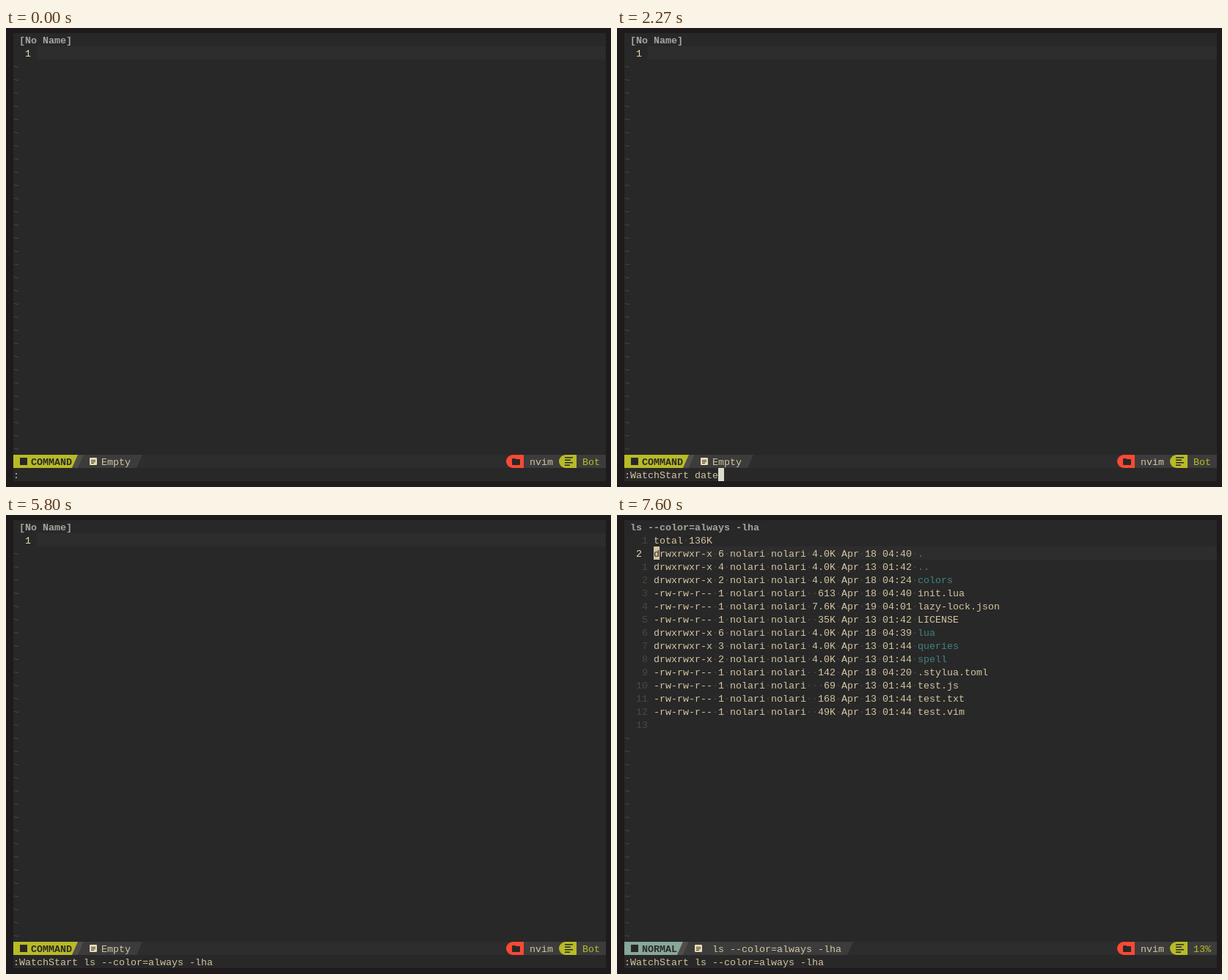
An HTML page with a canvas that plays this animation: 825x627 px, repeating every 8000 ms.

```html
<!DOCTYPE html>
<html>
<head>
<meta charset="utf-8">
<style>
html, body { margin: 0; width: 100%; height: 100%; overflow: hidden; background: #1f1a1b; }
canvas { display: block; }
</style>
</head>
<body>
<canvas id="stage" width="825" height="627"></canvas>
<script>
const ctx = document.getElementById('stage').getContext('2d');
const LOOP = 8000, COL = 8, ROW = 18, LEFT = 10, TOP = 7;
const BG = '#282828', LINE = '#2d2d2d', PANEL = '#3c3c3c', GAP = '#504c4a', FG = '#d5c4a1', BRIGHT = '#ebdbb2',
  DIM = '#4b4744', TEAL = '#458080', PINK = '#c08288', LIME = '#b8bb26', RED = '#fb4934', SAGE = '#88a898',
  BLOCK = '#dcdcd0';
const LS = 'ls --color=always -lha', USER = 'nolari';
const COMMANDS = ['WLR', 'WhichKey', 'WatchFile', 'WatchStop', 'WatchStart'];

const dir = (links, size, date, name) => entry('drwxrwxr-x', links, size, date, name, TEAL);
const file = (size, date, name) => entry('-rw-rw-r--', 1, size, date, name, FG);
function entry(mode, links, size, date, name, color) {
  return { info: `${mode} ${links} ${USER} ${USER} ${size.padStart(4)} Apr ${date} `, name, color };
}
const LISTING = [
  { info: 'total 136K', name: '' },
  dir(6, '4.0K', '18 04:40', '.'),
  dir(4, '4.0K', '13 01:42', '..'),
  dir(2, '4.0K', '18 04:24', 'colors'),
  file('613', '18 04:40', 'init.lua'),
  file('7.6K', '19 04:01', 'lazy-lock.json'),
  file('35K', '13 01:42', 'LICENSE'),
  dir(6, '4.0K', '18 04:39', 'lua'),
  dir(3, '4.0K', '13 01:44', 'queries'),
  dir(2, '4.0K', '13 01:44', 'spell'),
  file('142', '18 04:20', '.stylua.toml'),
  file('69', '13 01:44', 'test.js'),
  file('168', '13 01:44', 'test.txt'),
  file('49K', '13 01:44', 'test.vim'),
  { info: '', name: '' }
];

// Each step overrides the state from its time onward.
const STEPS = [
  [0, { cmd: ':', cursor: false, popup: 0, line: 0, block: BLOCK }],
  [200, { cursor: true }],
  [730, { cmd: ':W', popup: 5, match: 1 }],
  [1200, { cmd: ':Wa' }],
  [1270, { popup: 3, match: 2 }],
  [1670, { cursor: false }],
  [2200, { cmd: ':WatchStart date', cursor: true }],
  [2270, { popup: 0 }],
  [2800, { cmd: ':WatchStart ' + LS }],
  [3270, { cursor: false }],
  [3800, { cursor: true }],
  [4270, { cursor: false }],
  [4730, { cursor: true }],
  [5270, { cursor: false }],
  [5330, { cmd: `:WatchStart ${LS} `, cursor: true }],
  [5800, { cursor: false }],
  [6330, { cursor: true }],
  [6470, { cmd: ':WatchStart ' + LS, block: FG }],
  [6800, { line: 1 }],
  [7270, { cursor: false }],
  [7600, { line: 2, cursor: true }]
];

const px = col => LEFT + col * COL;
const py = row => TOP + row * ROW;

function rect(x, y, w, h, color) {
  ctx.fillStyle = color;
  ctx.fillRect(x, y, w, h);
}

function text(col, row, str, color, bold) {
  ctx.font = `${bold ? 'bold ' : ''}13.333px "Liberation Mono", monospace`;
  ctx.fillStyle = color;
  ctx.fillText(str, px(col), py(row) + 14);
}

function rounded(x, y, w, h, radii, color) {
  ctx.fillStyle = color;
  ctx.beginPath();
  ctx.roundRect(x, y, w, h, radii);
  ctx.fill();
}

// Status segment with slanted right edge, and left edge unless it is flush.
function segment(from, to, color, flush) {
  const y = py(32);
  ctx.fillStyle = color;
  ctx.beginPath();
  ctx.moveTo(px(from), y);
  ctx.lineTo(px(to), y);
  ctx.lineTo(px(to - 1), y + ROW);
  ctx.lineTo(px(flush ? from : from - 1), y + ROW);
  ctx.fill();
}

function statusBar(line) {
  const y = py(32);
  const mode = line ? 'NORMAL' : 'COMMAND';
  const edge = line ? 10 : 11;
  const iconX = px(edge + 2);
  rect(LEFT, y, 808, ROW, LINE);
  segment(edge + 1, line ? 39 : 22, PANEL);
  segment(edge, edge + 1, GAP);
  segment(0, edge, line ? SAGE : LIME, true);
  rect(19, y + 4, 10, 10, BG);
  text(3, 32, mode, BG, true);
  rounded(iconX, y + 4, 10, 10, 1, BRIGHT);
  [[3, 6], [5, 6], [7, 4]].forEach(([dy, w]) => rect(iconX + 2, y + 4 + dy, w, 1, PANEL));
  text(15, 32, line ? LS : 'Empty', FG);

  rect(706, y, 112, ROW, PANEL);
  rounded(682, y, 24, ROW, [9, 0, 0, 9], RED);
  rounded(690, y + 5, 5, 4, 1, BG);
  rounded(690, y + 6, 11, 8, 1, BG);
  text(88, 32, 'nvim', FG);
  rounded(754, y, 24, ROW, [9, 0, 0, 9], LIME);
  [11, 8, 11, 7].forEach((w, i) => rect(762, y + 3 + i * 3.5, w, 1.5, BG));
  text(97, 32, ['Bot', 'Top', '13%'][line], LIME);
}

function popup(count, match) {
  const top = 31 - count;
  rect(LEFT, py(top), 27 * COL, (count + 2) * ROW, BG);
  ctx.strokeStyle = '#5d5650';
  ctx.lineWidth = 1;
  ctx.beginPath();
  ctx.roundRect(13.5, py(top) + 8.5, 208, (count + 1) * ROW, 4);
  ctx.stroke();
  COMMANDS.slice(-count).forEach((name, i) => {
    const row = top + 1 + i;
    text(2, row, name.slice(0, match), TEAL, true);
    text(2 + match, row, name.slice(match), FG);
    text(14, row, 'α', PINK, true);
    text(17, row, 'Variable', PINK);
  });
}

function listing(current) {
  rect(px(5), py(current), 818 - px(5), ROW, LINE);
  LISTING.forEach(({ info, name, color }, i) => {
    const row = i + 1;
    if (row === current) text(2, row, String(row), BRIGHT);
    else text(2, row, String(Math.abs(row - current)).padStart(2), DIM);
    text(5, row, info, FG);
    text(5, row, info.replace(/\S/g, '\u00a0').replace(/ /g, '·'), DIM);
    text(5 + info.length, row, name, color);
  });
}

function cell(col, row, color) {
  rect(px(col), py(row), COL, ROW, color);
}

function draw(t) {
  const s = Object.assign({}, ...STEPS.filter(([at]) => t >= at).map(([, change]) => change));
  rect(0, 0, 825, 627, '#1f1a1b');
  rect(LEFT, TOP, 808, 612, BG);
  text(1, 0, s.line ? LS : '[No Name]', '#a5a5a0', true);
  for (let row = s.line ? 16 : 2; row < 32; row++) text(0, row, '~', DIM);
  if (s.line) {
    listing(s.line);
  } else {
    rect(px(4), py(1), 818 - px(4), ROW, LINE);
    text(2, 1, '1', BRIGHT);
  }
  statusBar(s.line);
  if (s.popup) popup(s.popup, s.match);
  text(0, 33, s.cmd, FG);
  if (!s.cursor) return;
  if (s.line) {
    cell(5, s.line, FG);
    text(5, s.line, LISTING[s.line - 1].info[0], BG);
  } else {
    cell(s.cmd.length, 33, s.block);
  }
}

function tick() {
  draw(performance.now() % LOOP);
  requestAnimationFrame(tick);
}
tick();
</script>
</body>
</html>
```
